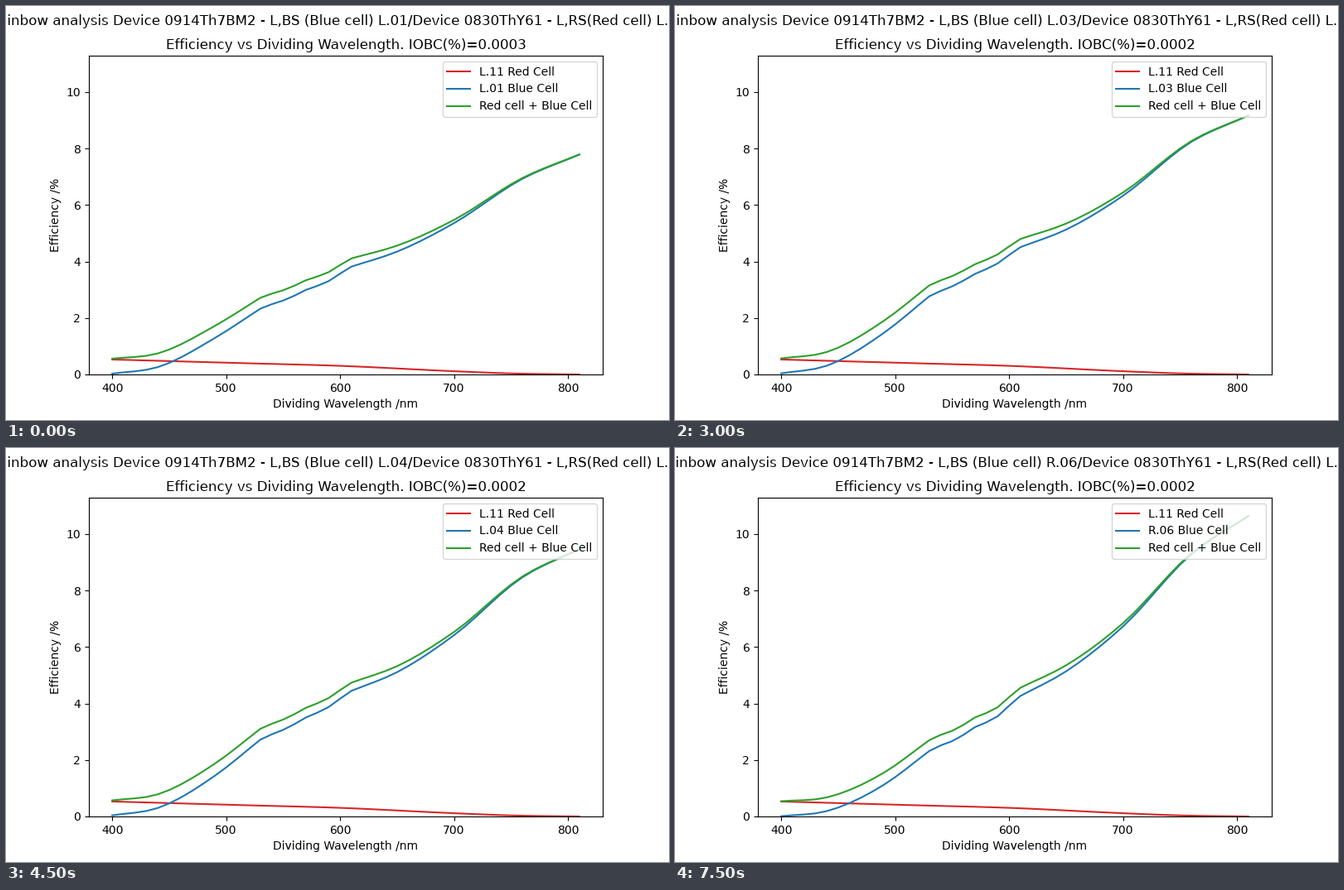
Animation, 800 px wide and 500 px high, one loop 8000 ms. Source, as a matplotlib script:

```python
import numpy as np
import matplotlib.pyplot as plt
from matplotlib.animation import FuncAnimation

STEP_MS = 500
STEPS_PER_CELL = 3
LOOP_MS = 8000

plt.rcParams.update({"font.family": "DejaVu Sans",
                     "text.hinting": "no_autohint",
                     "text.hinting_factor": 24})

wave = np.arange(400, 811, 10)


def smooth(x, y):
    """Cubic Hermite curve through a few points."""
    x, y = np.array(x, float), np.array(y, float)
    m = np.gradient(y, x)
    i = np.clip(np.searchsorted(x, wave, "right") - 1, 0, len(x) - 2)
    h = x[i + 1] - x[i]
    s = (wave - x[i]) / h
    return (y[i] * (1 + 2 * s) * (1 - s)**2 + y[i + 1] * s**2 * (3 - 2 * s)
            + h * s * (1 - s) * (m[i] * (1 - s) - m[i + 1] * s))


def response(low, high, depth=1.0):
    """Smooth rise on both sides of a rippled band from 530 to 610 nm."""
    u = (wave - 530) / 80
    ripple = np.sin(np.pi * u) * (.12 - .04 * np.cos(4 * np.pi * u)) * (.5 + u)
    band = low[-1] + (high[0] - low[-1]) * u - depth * ripple
    return np.where(wave < 530, smooth([400, 440, 490, 530], low),
                    np.where(wave > 610,
                             smooth([610, 650, 700, 760, 810], high), band))


def drop(curve, amount, *spans):
    """Lower the curve by a fixed amount inside each span."""
    inside = sum((wave >= a) & (wave <= b) for a, b in spans)
    return curve - amount * inside


red = smooth([400, 520, 600, 700, 750, 810], [.53, .395, .305, .115, .037, 0])

cell_1 = response([.03, .26, 1.29, 2.33], [3.82, 4.35, 5.36, 6.93, 7.79])
cell_2 = drop(response([0, .25, 1.41, 2.70], [4.48, 5.14, 6.42, 8.36, 9.33]),
              .31, (460, 470), (530, 680), (740, 780))
cell_3 = response([.04, .31, 1.47, 2.77], [4.51, 5.13, 6.33, 8.24, 9.17])
cell_4 = response([.04, .30, 1.44, 2.72], [4.45, 5.11, 6.42, 8.47, 9.47])
cell_5 = .16 * ((wave - 400) / 410)**1.7
cell_6 = response([.01, .19, 1.12, 2.32], [4.27, 5.14, 6.73, 9.29, 10.64],
                  depth=1.65)

cells = [("L.01", "0.0003", cell_1), ("L.02", "0.0002", cell_2),
         ("L.03", "0.0002", cell_3), ("L.04", "0.0002", cell_4),
         ("R.05", "0.0196", cell_5), ("R.06", "0.0002", cell_6)]

fig, ax = plt.subplots(figsize=(8, 5), dpi=100)
heading = fig.suptitle("")
title = ax.set_title(" ")
ax.set(xlim=(379.5, 830.5), ylim=(0, 11.29),
       xlabel="Dividing Wavelength /nm", ylabel="Efficiency /%")

ax.plot(wave, red, color="tab:red", label="L.11 Red Cell")
blue_line, = ax.plot(wave, cell_1, color="tab:blue", label="L.01 Blue Cell")
sum_line, = ax.plot(wave, red + cell_1, color="tab:green",
                    label="Red cell + Blue Cell")
blue_label = ax.legend(loc="upper right").get_texts()[1]


def draw(i):
    name, iobc, blue = cells[i // STEPS_PER_CELL]
    heading.set_text(f"Rainbow analysis Device 0914Th7BM2 - L,BS (Blue cell) "
                     f"{name}/Device 0830ThY61 - L,RS(Red cell) L.11")
    title.set_text(f"Efficiency vs Dividing Wavelength. IOBC(%)={iobc}")
    blue_label.set_text(f"{name} Blue Cell")
    blue_line.set_ydata(blue)
    sum_line.set_ydata(red + blue)
    return heading, title, blue_label, blue_line, sum_line


anim = FuncAnimation(fig, draw, frames=LOOP_MS // STEP_MS, interval=STEP_MS,
                     repeat=True, repeat_delay=0, blit=False)
plt.show()
```
